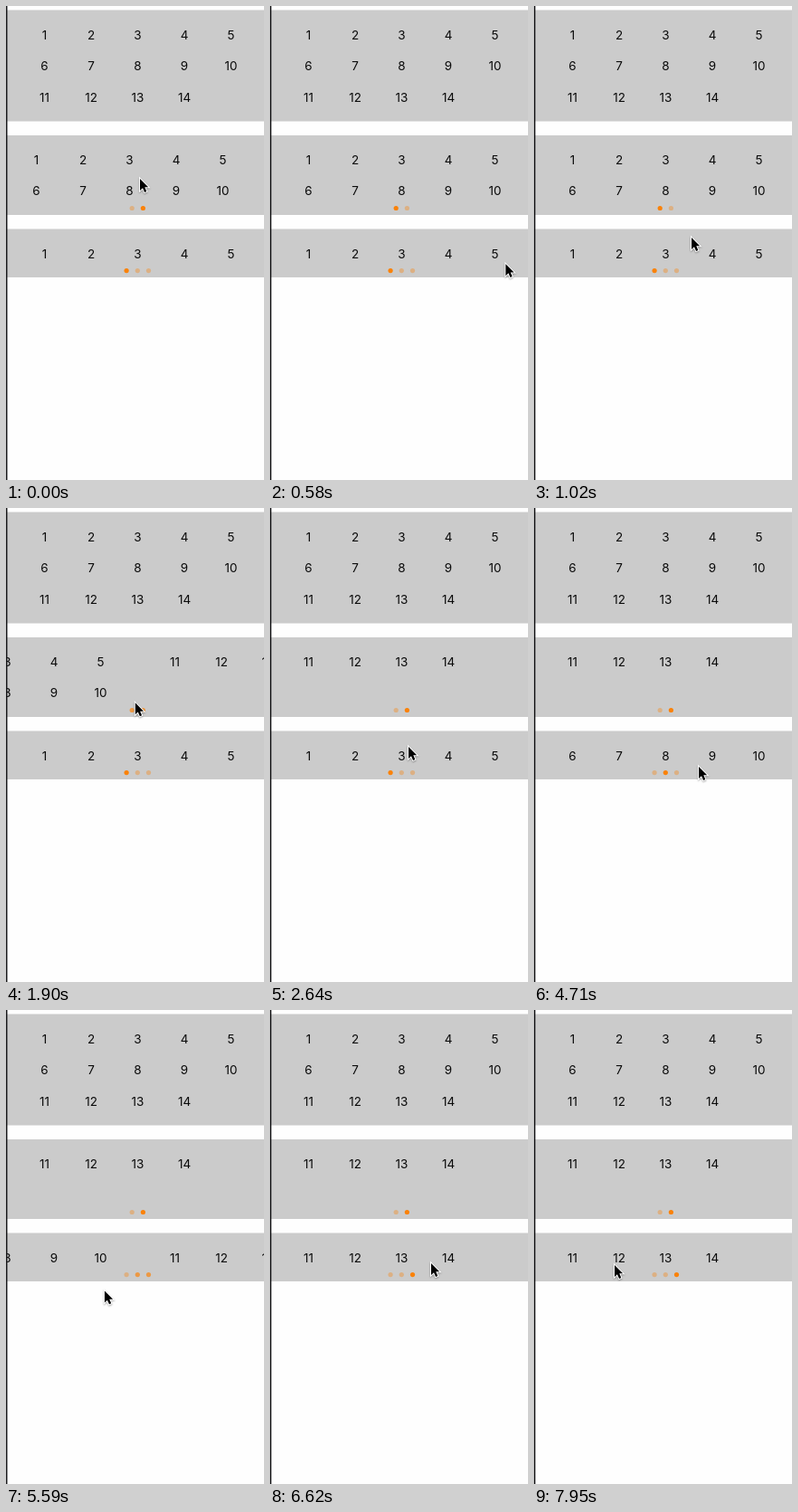
An HTML page with a canvas that plays this animation: 285x524 px, repeating every 8 s.

```html
<!DOCTYPE html>
<html lang="en">
<head>
<meta charset="utf-8">
<title>Paged grids</title>
<style>
  html, body { margin: 0; height: 100%; overflow: hidden; background: #fff; }
  canvas { display: block; }
</style>
</head>
<body>
<canvas width="285" height="524"></canvas>
<script>
const ctx = document.querySelector('canvas').getContext('2d');
const LOOP = 8000, STEP = 147.2, PAGE = 288, COUNT = 14, COLS = 5;
const arrow = new Path2D('M0 0V13L3 10.2L5.1 14.9L7.3 13.9L5.3 9.3H9.2Z');

// Where the pointer pauses: [step, x, y].
const stops = [
  [0, 148, 191], [7, 174, 256], [8, 200, 206], [11, 200, 207], [18, 153, 264],
  [20, 172, 281], [24, 171, 282], [32, 182, 286], [36, 171, 287],
  [45, 178, 280], [48, 171, 280], [54, 89, 282]
];
// Swings of the pointer away from the straight way between two stops.
const swings = [
  { start: 0, steps: 7, reach: 100, dip: 60 },
  { start: 11, steps: 7, reach: -56, dip: -13 },
  { start: 24, steps: 8, reach: -85, dip: 70 },
  { start: 36, steps: 8, reach: -90, dip: 50 }
];

const progress = (step, start, length) => Math.min(1, Math.max(0, (step - start) / length));
const pulse = k => Math.sin(Math.PI * k);

// Scroll distance of one page turn, half done at the given step.
function turn(step, middle) {
  const k = progress(step, middle - 2.5, 5);
  return PAGE * k * k * (3 - 2 * k);
}

function pointer(step) {
  const next = Math.max(1, stops.findIndex(stop => stop[0] >= step));
  const [s0, x0, y0] = stops[next - 1], [s1, x1, y1] = stops[next];
  const k = progress(step, s0, s1 - s0);
  let x = x0 + (x1 - x0) * k, y = y0 + (y1 - y0) * k;
  for (const { start, steps, reach, dip } of swings) {
    const p = pulse(progress(step, start, steps));
    x += reach * p;
    y += dip * p * p;
  }
  return [x, y];
}

function drawGrid(top, height, rows, offset) {
  ctx.fillStyle = '#cbcbcb';
  ctx.fillRect(0, top, 285, height);
  ctx.fillStyle = '#0a0a0a';
  for (let i = 0; i < COUNT; i++) {
    const page = Math.floor(i / (rows * COLS));
    const row = Math.floor(i / COLS) % rows;
    const x = 42.5 + i % COLS * 51.5 + page * PAGE - offset;
    ctx.fillText(i + 1, x, Math.round(top + 32) + Math.floor(row * 34.5));
  }
}

function drawDots(count, y, current) {
  ctx.fillStyle = '#fa8208';
  for (let i = 0; i < count; i++) {
    const active = Math.max(0, 1 - Math.abs(i - current));
    ctx.globalAlpha = 0.37 + 0.63 * active;
    ctx.beginPath();
    ctx.arc(145.3 + (i - (count - 1) / 2) * 12.2, y, 2.6, 0, 7);
    ctx.fill();
  }
  ctx.globalAlpha = 1;
}

function drawCursor(x, y) {
  ctx.save();
  ctx.translate(x, y);
  ctx.shadowColor = '#0005';
  ctx.shadowBlur = 2;
  ctx.shadowOffsetY = 1;
  ctx.strokeStyle = '#fff';
  ctx.lineWidth = 2;
  ctx.stroke(arrow);
  ctx.shadowColor = 'transparent';
  ctx.fillStyle = '#000';
  ctx.fill(arrow);
  ctx.restore();
}

function draw(now) {
  const step = Math.floor((now % LOOP + 15) / STEP);
  const settle = 9 * (1 - progress(step, 0, 1));
  const bounce = 24 * pulse(progress(step, 48, 6));
  const middle = settle + turn(step, 13);
  const bottom = turn(step, 26) + turn(step, 38) + bounce;

  ctx.fillStyle = '#fefefe';
  ctx.fillRect(0, 0, 285, 524);
  ctx.font = '13.5px Inter, sans-serif';
  ctx.textAlign = 'center';
  drawGrid(4.5, 123, 3, 0);
  drawGrid(143, 88, 2, middle);
  drawDots(2, 223.5, settle ? 1 : middle / PAGE);
  drawGrid(246.5, 53.5, 1, bottom);
  drawDots(3, 292.6, Math.min(2, bottom / PAGE));
  ctx.fillStyle = '#1c1c1e';
  ctx.fillRect(0, 0, 1.5, 524);
  drawCursor(...pointer(step));
  requestAnimationFrame(draw);
}
requestAnimationFrame(draw);
</script>
</body>
</html>
```
